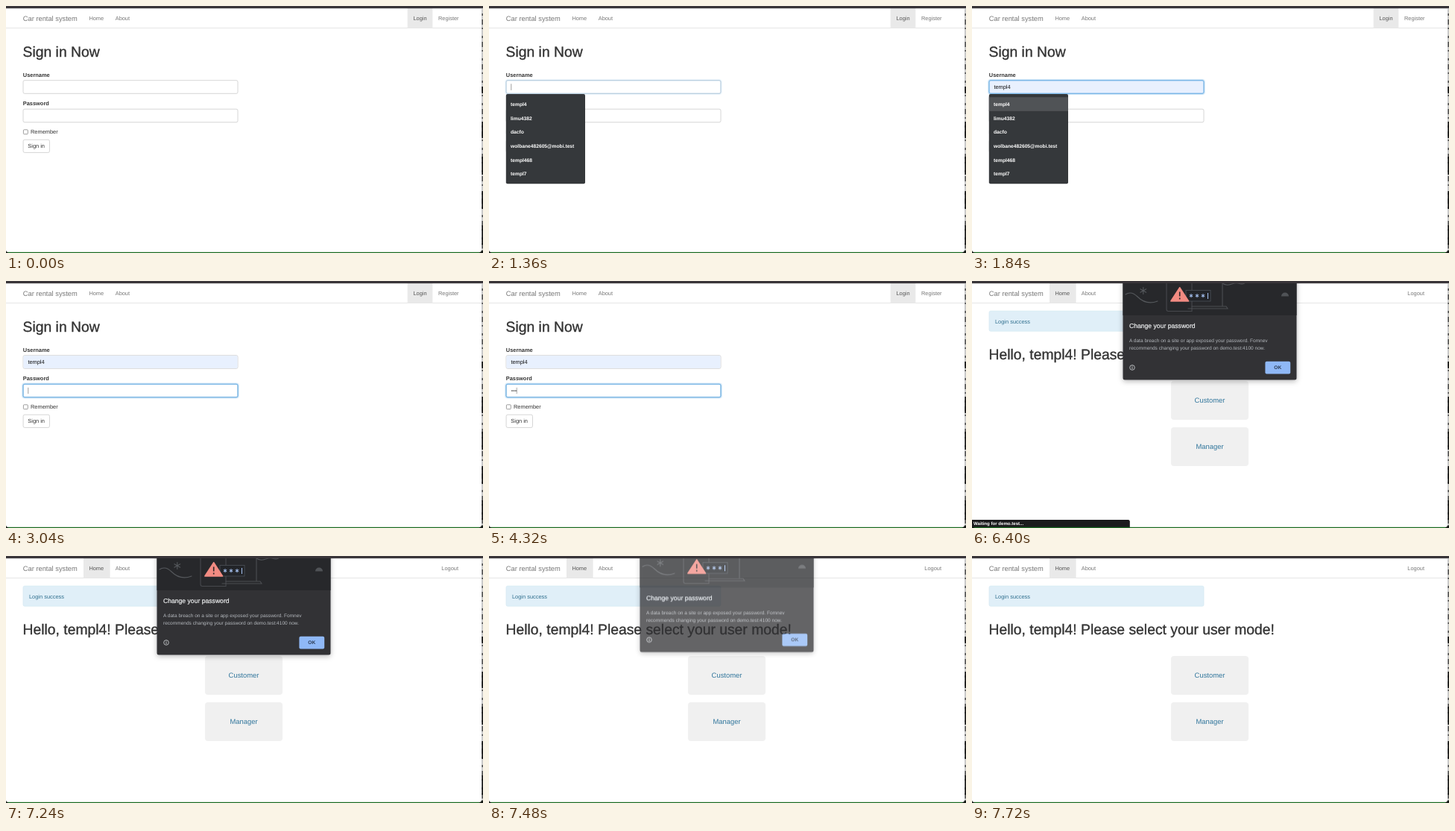
An HTML page for the animation above (8000 ms loop, 640 by 331 pixels).

```html
<!DOCTYPE html>
<html lang="en">
<head>
<meta charset="utf-8">
<title>Car rental system</title>
<style>
html, body { margin: 0; width: 100%; height: 100%; overflow: hidden; background: #fff; }
svg { display: block; width: 100%; height: 100%; }
text {
  font: 7.42px "Liberation Sans", Arial, sans-serif;
  fill: #333; text-rendering: geometricPrecision; white-space: pre;
}
.brand { font-size: 9.32px; fill: #777; }
.nav { fill: #777; }
.active { fill: #555; }
.title { font-size: 19.32px; stroke: #333; stroke-width: .35px; }
.label { font-weight: bold; }
.link { font-size: 9.42px; fill: #31769c; text-anchor: middle; }
.items text { font-size: 6.7px; font-weight: bold; fill: #fff; }
.status text { font-size: 6.1px; font-weight: bold; fill: #fff; }
.head { font-size: 8.62px; fill: #f1f3f4; stroke: #f1f3f4; stroke-width: .2px; }
.body { font-size: 6.56px; fill: #b4b8bd; }
.ok { font-size: 6.6px; font-weight: bold; fill: #2b3a52; text-anchor: middle; }
.field { fill: #fff; stroke: #ccc; stroke-width: .8px; }
.tab { fill: #e9e9e9; }
.glow { fill: none; stroke: #66afe9; }
.caret { fill: #777; }
.art { fill: none; stroke: #55585c; stroke-width: 1.1px; stroke-linecap: round; }

/* 1% of the loop is 80 ms */
[class*="t-"] { animation: 8s step-end infinite; }
.t-login { animation-name: login; }
.t-home { animation-name: home; }
.t-user-glow { animation-name: userGlow; animation-timing-function: linear; }
.t-pass-glow { animation-name: passGlow; animation-timing-function: linear; }
.t-menu { animation-name: menu; }
.t-hover { animation-name: hover; }
.t-filled { animation-name: filled; }
.t-caret-a { animation-name: caretA; }
.t-caret-b { animation-name: caretB; }
.t-caret-c { animation-name: caretC; }
.t-pen { animation-name: pen; }
.t-over { animation-name: over; }
.t-press { animation-name: press; }
.t-status { animation-name: status; animation-timing-function: linear; }
.t-popup { animation-name: popup; animation-timing-function: linear; }

@keyframes login { 0% { opacity: 1 } 74.5%, 100% { opacity: 0 } }
@keyframes home { 0% { opacity: 0 } 74.5%, 100% { opacity: 1 } }
@keyframes userGlow {
  0%, 16.5% { opacity: 0 } 18%, 35.5% { opacity: 1 } 37.5%, 100% { opacity: 0 }
}
@keyframes passGlow {
  0%, 35.5% { opacity: 0 } 37.5%, 69% { opacity: 1 } 70.5%, 100% { opacity: 0 }
}
@keyframes menu { 0% { opacity: 0 } 16.5% { opacity: 1 } 27%, 100% { opacity: 0 } }
@keyframes hover { 0% { opacity: 0 } 22% { opacity: 1 } 27%, 100% { opacity: 0 } }
@keyframes filled { 0% { opacity: 0 } 22%, 100% { opacity: 1 } }
@keyframes caretA { 0% { opacity: 0 } 16.5% { opacity: 1 } 22%, 100% { opacity: 0 } }
@keyframes caretB { 0% { opacity: 0 } 27% { opacity: 1 } 33%, 100% { opacity: 0 } }
@keyframes caretC {
  0% { opacity: 0 } 35.5% { opacity: 1 } 41% { opacity: 0 }
  47% { opacity: 1 } 67%, 100% { opacity: 0 }
}
@keyframes pen {
  0% { transform: none }
  48% { transform: translateX(2.5px) }
  50% { transform: translateX(5px) }
  54% { transform: translateX(7.5px) }
  58% { transform: translateX(10px) }
  61%, 100% { transform: translateX(12.5px) }
}
@keyframes over { 0% { opacity: 0 } 64%, 100% { opacity: 1 } }
@keyframes press { 0% { opacity: 0 } 69%, 100% { opacity: 1 } }
@keyframes status {
  0%, 74.99% { opacity: 0 } 75%, 80.5% { opacity: 1 } 83.5%, 100% { opacity: 0 }
}
@keyframes popup {
  0%, 79.99% { opacity: 0; transform: none }
  80%, 92.75% { opacity: 1; transform: none }
  93.5% { opacity: .76; transform: translateY(-3.7px) }
  95.5%, 100% { opacity: 0; transform: translateY(-8px) }
}
</style>
</head>
<body>
<svg viewBox="0 0 640 331" preserveAspectRatio="none">
  <defs>
    <filter id="shade" x="-10%" y="-10%" width="120%" height="130%">
      <feDropShadow dx="0" dy="2" stdDeviation="3.5" flood-opacity=".28"/>
    </filter>
  </defs>
  <rect width="640" height="331" fill="#fff"/>
  <rect y="29" width="638" height=".9" fill="#e4e4e4"/>
  <text class="brand" x="22.8" y="19.8">Car rental system</text>

  <g class="t-login">
    <rect class="tab" x="538.7" y="3" width="33.6" height="26.5"/>
    <text class="nav" x="111.4" y="19.3">Home</text>
    <text class="nav" x="146.7" y="19.3">About</text>
    <text class="active" x="546.5" y="19.3">Login</text>
    <text class="nav" x="580" y="19.3">Register</text>
    <text class="title" x="22.6" y="68.3">Sign in Now</text>

    <text class="label" x="22.8" y="94.7">Username</text>
    <rect class="field" x="23" y="99.7" width="288" height="17.6" rx="2"/>
    <g class="t-filled">
      <rect x="23.4" y="100.1" width="287.2" height="16.8" rx="1.7" fill="#e8f0fe"/>
      <text x="29.4" y="111.1" style="fill:#111">templ4</text>
    </g>
    <g class="glow t-user-glow">
      <rect x="22.6" y="99.3" width="288.8" height="18.4" rx="2.4" stroke-width="2.8" opacity=".3"/>
      <rect x="23" y="99.7" width="288" height="17.6" rx="2" stroke-width=".9"/>
    </g>
    <rect class="caret t-caret-a" x="29.5" y="104.3" width=".7" height="8.6"/>
    <rect class="caret t-caret-b" x="52.2" y="104.3" width=".7" height="8.6"/>

    <text class="label" x="22.8" y="133">Password</text>
    <rect class="field" x="23" y="138.2" width="288" height="17.6" rx="2"/>
    <g fill="#444">
      <circle cx="31" cy="147.1" r=".9"/>
      <circle cx="33.5" cy="147.1" r=".9"/>
      <circle cx="36" cy="147.1" r=".9"/>
      <circle cx="38.5" cy="147.1" r=".9"/>
      <circle cx="41" cy="147.1" r=".9"/>
    </g>
    <g class="t-pen">
      <rect x="29.6" y="143" width="14" height="8" fill="#fff"/>
      <rect class="caret t-caret-c" x="29.5" y="142.8" width=".7" height="8.4"/>
    </g>
    <g class="glow t-pass-glow">
      <rect x="22.6" y="137.8" width="288.8" height="18.4" rx="2.4" stroke-width="2.8" opacity=".3"/>
      <rect x="23" y="138.2" width="288" height="17.6" rx="2" stroke-width=".9"/>
    </g>

    <rect x="23.4" y="165.8" width="5.9" height="5.9" rx="1" fill="#fff" stroke="#767676" stroke-width=".7"/>
    <text x="33" y="171.3">Remember</text>
    <rect class="field" x="23.1" y="179.2" width="35.4" height="17.2" rx="2"/>
    <rect class="t-over" x="23.1" y="179.2" width="35.4" height="17.2" rx="2" fill="#e6e6e6" stroke="#adadad" stroke-width=".8"/>
    <g class="t-press">
      <rect x="22.8" y="179" width="36" height="17.6" rx="2.4" fill="#a9c6e6"/>
      <rect x="24" y="180.2" width="33.6" height="15.2" rx="1.8" fill="#e4e6e8" stroke="#3f76b5" stroke-width="1.3"/>
    </g>
    <text x="29.3" y="190.4">Sign in</text>

    <g class="items t-menu">
      <rect x="22.8" y="118" width="106.2" height="120.2" rx="2" fill="#35383b"/>
      <rect class="t-hover" x="22.8" y="122.2" width="106.2" height="18.7" fill="#505356"/>
      <text x="29" y="133.9">templ4</text>
      <text x="29" y="152.6">limu4382</text>
      <text x="29" y="171.2">dacfo</text>
      <text x="29" y="189.9">wolbane482605@mobi.test</text>
      <text x="29" y="208.6">templ468</text>
      <text x="29" y="227.3">templ7</text>
    </g>
  </g>

  <g class="t-home">
    <rect class="tab" x="104" y="3" width="35.6" height="26.5"/>
    <text class="active" x="111.4" y="19.3">Home</text>
    <text class="nav" x="146.7" y="19.3">About</text>
    <text class="nav" x="584.3" y="19.3">Logout</text>
    <rect x="23" y="40.2" width="288" height="27" rx="2" fill="#e0eff8" stroke="#d3e9f2" stroke-width=".7"/>
    <text x="31" y="56.5" style="fill:#31708f">Login success</text>
    <text class="title" x="22.6" y="105.2">Hello, templ4! Please select your user mode!</text>
    <rect x="267" y="134" width="104" height="52" rx="4" fill="#f0f0f0"/>
    <text class="link" x="319" y="163">Customer</text>
    <rect x="267" y="196" width="104" height="52" rx="4" fill="#f0f0f0"/>
    <text class="link" x="319" y="225">Manager</text>
  </g>

  <g class="status t-status">
    <path d="M0 320H209.5Q211.8 320 211.8 322.3V331H0Z" fill="#1b1b1d"/>
    <text x="2" y="327.4">Waiting for demo.test...</text>
  </g>

  <g class="t-popup">
    <rect x="202.5" y="-8" width="233" height="140.4" rx="2.5" fill="#323336" filter="url(#shade)"/>
    <rect x="202.5" y="-8" width="233" height="54" fill="#27282b"/>
    <g class="art">
      <path d="M206 18C212 14 217 16 222 21S236 32 249 27"/>
      <path d="M229.8 8.5v9M225.9 10.8l7.8 4.4M233.7 10.8l-7.8 4.4"/>
      <path d="M261 -4V38Q261 40.5 263.5 40.5H295V-4" opacity=".7"/>
      <path d="M295 34H336V-4M290 37H343L341 34H336" opacity=".8"/>
      <path d="M336 3C344 9 350 1 357 3S366 4 370 -2"/>
    </g>
    <path d="M415 20.5A5 5 0 0 1 425 20.5Z" fill="#505357"/>
    <rect x="287" y="12.5" width="33" height="14.5" fill="#222428" stroke="#4d5158" stroke-width=".8"/>
    <g fill="none" stroke="#a9c6f7" stroke-width="1">
      <path id="star" d="M294 17.2v5M291.8 18.4l4.4 2.6M296.2 18.4l-4.4 2.6"/>
      <use href="#star" x="8"/>
      <use href="#star" x="16"/>
      <path d="M316.5 16v8"/>
    </g>
    <path d="M278.7 8.7L290.6 27H266.8Z" fill="#f28b82" stroke="#f28b82" stroke-width="1.4" stroke-linejoin="round"/>
    <path d="M278.7 14.5v6M278.7 22.6v1.8" stroke="#2b2526" stroke-width="1.6"/>
    <text class="head" x="211" y="63.2">Change your password</text>
    <text class="body" x="211" y="81.8">A data breach on a site or app exposed your password. Fomnev</text>
    <text class="body" x="211" y="92.3">recommends changing your password on demo.test:4100 now.</text>
    <circle cx="215" cy="116" r="3.3" fill="none" stroke="#d5d8db" stroke-width=".8"/>
    <path d="M215 115.3v2.6M215 113.7v.9" stroke="#d5d8db" stroke-width=".9"/>
    <rect x="393.4" y="107.8" width="33.8" height="16.6" rx="2" fill="#8fb8f6"/>
    <text class="ok" x="410.2" y="118.4">OK</text>
  </g>

  <!-- window edges -->
  <rect width="640" height="3.2" fill="#393539"/>
  <rect x="638" y="3" width="2" height="328" fill="#c9c9c9"/>
  <path d="M639.2 10V331" stroke="#555" stroke-width="1.6" stroke-dasharray="3 5 7 4 2 9"/>
  <path d="M639.2 108v9M639.2 155v22M639.2 202v24M639.2 248v24M639.2 294v26" stroke="#151515" stroke-width="1.6"/>
  <rect y="329.8" width="640" height="1.2" fill="#1c6a22"/>
  <path d="M0 327.5Q.4 330 3 330.2V331H0ZM638 327.5Q637.6 330 635 330.2V331H640V327.5Z" fill="#151a15"/>
</svg>
</body>
</html>
```
